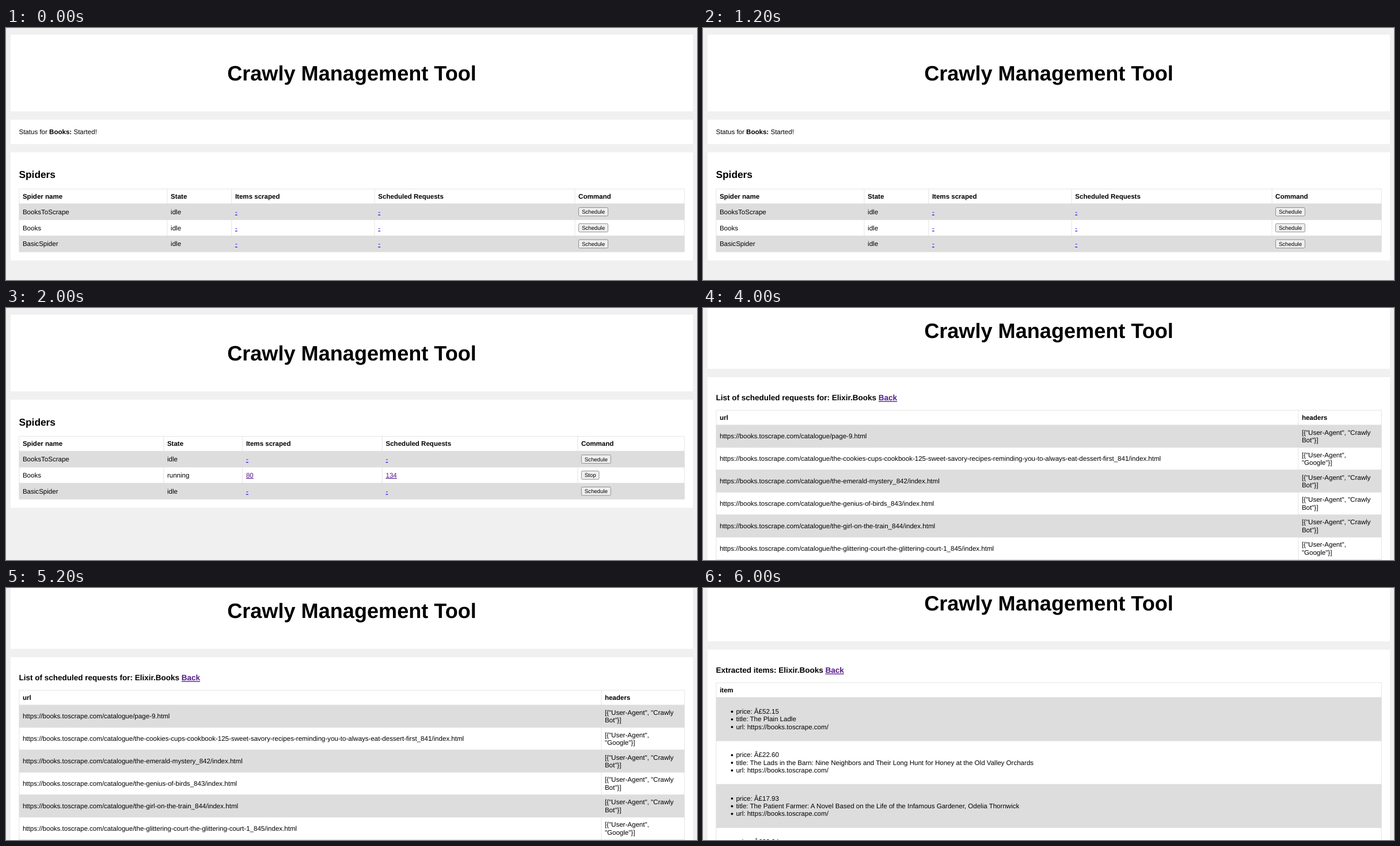
Animation of 1200 by 437 pixels, one loop 8 s. Source, as an HTML page:

```html
<!DOCTYPE html>
<html lang="en">
<head>
<meta charset="utf-8">
<title>Crawly Management Tool</title>
<style>
  html, body { margin: 0; width: 100%; height: 100%; overflow: hidden; background: #f0f0f0; }
  svg { display: block; width: 1200px; height: 437px; }
  text {
    font: 11.56px "Liberation Sans", Arial, sans-serif;
    text-rendering: geometricPrecision;
    white-space: pre;
  }
  .b { font-weight: bold; }
  .h1 { font-size: 36.12px; font-weight: bold; text-anchor: middle; }
  .h2 { font-size: 17.34px; font-weight: bold; }
  .h3 { font-size: 13.53px; font-weight: bold; }
  .btn { font-size: 9.63px; text-anchor: middle; }
  .link { fill: #0000ee; text-decoration: underline; }
  .seen { fill: #551a8b; text-decoration: underline; }
</style>
</head>
<body>
<svg id="stage" viewBox="0 0 1200 437"></svg>
<script>
const NS = "http://www.w3.org/2000/svg";
const LEFT = 22.8, RIGHT = 1178.2, PAD = 6.1;
const LINE = 13.3, HEAD = 25.6;
const stage = document.getElementById("stage");
let page;

function add(parent, tag, attrs, content) {
  const el = document.createElementNS(NS, tag);
  for (const key in attrs) el.setAttribute(key, attrs[key]);
  if (content) el.textContent = content;
  parent.appendChild(el);
  return el;
}

const rect = (x, y, width, height, fill) => add(page, "rect", { x, y, width, height, fill });
const line = (x1, y1, x2, y2) =>
  add(page, "line", { x1, y1, x2, y2, stroke: "#ddd", "stroke-width": 0.8 });
const panel = (top, bottom) => rect(8, top, 1185, bottom - top, "#fff");
const text = (x, y, str, cls = "") => add(page, "text", { x, y, class: cls }, str);

// Text made of [string, class] runs
function runs(x, y, cls, parts) {
  const el = text(x, y, "", cls);
  for (const [str, c] of parts) add(el, "tspan", { class: c }, str);
}

function button(x, mid, label, width) {
  add(page, "rect", {
    x: x + 0.4, y: mid - 7.25, width: width - 0.8, height: 14.5, rx: 1.9,
    fill: "#efefef", stroke: "#767676", "stroke-width": 0.8
  });
  text(x + width / 2, mid + 3.4, label, "btn");
}

// Draws header cells, stripes and borders; returns the top of the first row
function table(top, cols, titles, count, height) {
  const first = top + HEAD, bottom = first + count * height;
  for (let i = 0; i < count; i += 2)
    rect(LEFT, first + i * height, RIGHT - LEFT, height, "#ddd");
  line(LEFT, top, RIGHT, top);
  for (let i = 0; i <= count; i++) line(LEFT, first + i * height, RIGHT, first + i * height);
  for (const x of [...cols, RIGHT]) line(x, top, x, bottom);
  titles.forEach((t, i) => text(cols[i] + PAD, top + 16.7, t, "b"));
  return first;
}

function header(scroll) {
  panel(11.5 - scroll, 144.5 - scroll);
  text(600.5, 90.7 - scroll, "Crawly Management Tool", "h1");
}

function spiders(top, cols, running) {
  panel(top, top + 187.5);
  text(22.45, top + 44.8, "Spiders", "h2");
  const height = 27.8;
  const first = table(top + 63.6, cols,
    ["Spider name", "State", "Items scraped", "Scheduled Requests", "Command"], 3, height);
  ["BooksToScrape", "Books", "BasicSpider"].forEach((name, i) => {
    const on = running && i === 1;
    const mid = first + (i + 0.5) * height, y = mid + 4;
    const cells = on ? [name, "running", "80", "134"] : [name, "idle", "-", "-"];
    cells.forEach((str, c) =>
      text(cols[c] + PAD, y, str, c < 2 ? "" : on ? "seen" : "link"));
    if (on) button(cols[4] + PAD, mid, "Stop", 31.4);
    else button(cols[4] + PAD, mid, "Schedule", 51.7);
  });
}

function listing(top, title) {
  panel(top, 440);
  runs(22.45, top + 40.4, "h3", [[title + " ", ""], ["Back", "seen"]]);
  return top + 57.3;
}

function scheduledPage() {
  header(0);
  panel(159, 201.3);
  runs(22.45, 184.1, "", [["Status for ", ""], ["Books:", "b"], [" Started!", ""]]);
  spiders(215.6, [LEFT, 280, 391.8, 640.2, 988], false);
}

function runningPage() {
  header(0);
  spiders(159, [LEFT, 273.8, 410.8, 653.4, 992.8], true);
}

function requestsPage() {
  header(39);
  const top = listing(120, "List of scheduled requests for: Elixir.Books");
  const cols = [LEFT, 1033.8], height = 38.9;
  const first = table(top, cols, ["url", "headers"], 7, height);
  const paths = [
    "page-9.html",
    "the-cookies-cups-cookbook-125-sweet-savory-recipes-reminding-you-to-always-eat-dessert-first_841/index.html",
    "the-emerald-mystery_842/index.html",
    "the-genius-of-birds_843/index.html",
    "the-girl-on-the-train_844/index.html",
    "the-glittering-court-the-glittering-court-1_845/index.html"
  ];
  paths.forEach((path, i) => {
    const y = first + (i + 0.5) * height + 4;
    const agent = i % 4 === 1 ? ['[{"User-Agent",', '"Google"}]'] : ['[{"User-Agent", "Crawly', 'Bot"}]'];
    text(LEFT + PAD, y, "https://books.toscrape.com/catalogue/" + path);
    agent.forEach((str, n) => text(cols[1] + PAD, y + (n - 0.5) * LINE, str));
  });
}

function itemsPage() {
  header(52);
  const top = listing(106.9, "Extracted items: Elixir.Books");
  const height = 75.3;
  const first = table(top, [LEFT], ["item"], 4, height);
  const books = [
    ["52.15", "The Plain Ladle"],
    ["22.60", "The Lads in the Barn: Nine Neighbors and Their Long Hunt for Honey at the Old Valley Orchards"],
    ["17.93", "The Patient Farmer: A Novel Based on the Life of the Infamous Gardener, Odelia Thornwick"],
    ["20.84", ""]
  ];
  books.forEach(([price, title], i) => {
    const rows = ["price: \u00c2\u00a3" + price, "title: " + title, "url: https://books.toscrape.com/"];
    rows.forEach((str, n) => {
      const y = first + i * height + 28.1 + n * LINE;
      add(page, "circle", { cx: 50.4, cy: y - 3.4, r: 1.9 });
      text(57.4, y, str);
    });
  });
}

const pages = [scheduledPage, runningPage, requestsPage, itemsPage].map(draw => {
  page = add(stage, "g", {});
  draw();
  return page;
});

const HOLD = 2000;
const start = performance.now();
function show() {
  const t = Math.max(0, performance.now() - start);
  const now = Math.floor(t / HOLD) % pages.length;
  pages.forEach((p, i) => { p.style.display = i === now ? "" : "none"; });
  requestAnimationFrame(show);
}
show();
</script>
</body>
</html>
```
